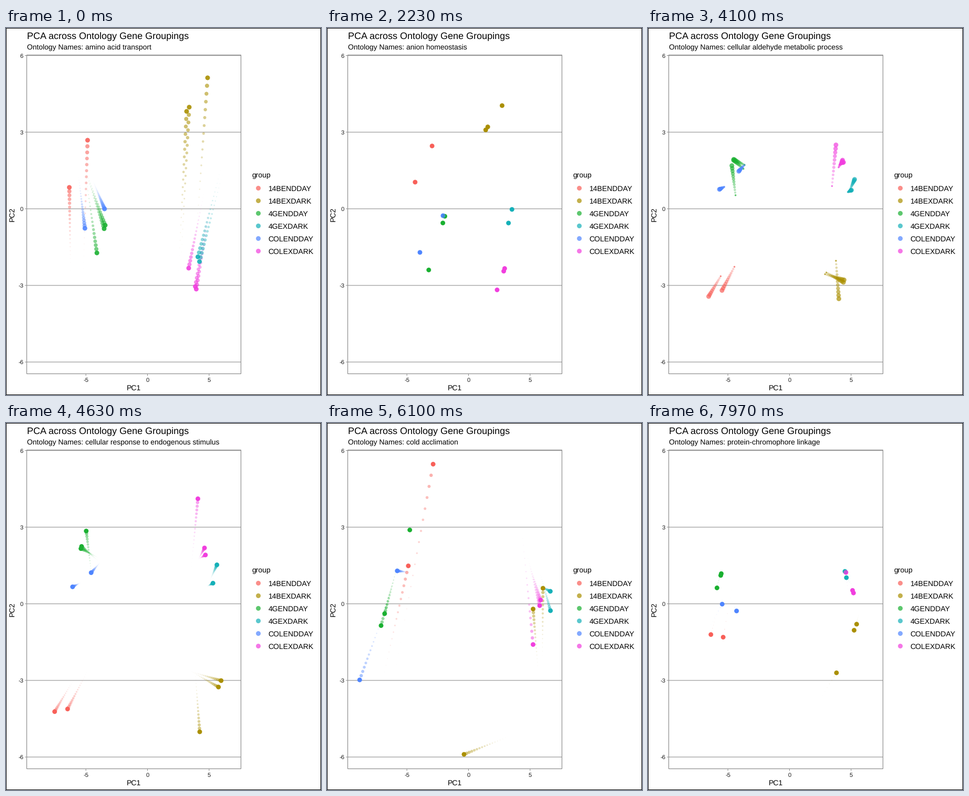
A matplotlib script that plays this animation: 600x700 px, repeating every 8 s.

```python
import numpy as np
import matplotlib.pyplot as plt
from matplotlib.animation import FuncAnimation
from matplotlib.colors import to_rgb

plt.rcParams.update({"path.snap": False, "text.hinting": "none",
                     "font.family": "Liberation Sans"})

W, H, DPI = 600, 700, 100
PX = 72 / DPI              # points per pixel
FRAMES = 240
CYCLE, MOVE = 45, 22       # frames from state to state, and in motion
WAKE = 24                  # frames a trail dot lives
RADIUS, ALPHA = 4.5, 0.7
GRID, FRAME = "#a6a6a6", "#8c8c8c"

NAMES = ["amino acid transport", "anion homeostasis",
         "cellular aldehyde metabolic process",
         "cellular response to endogenous stimulus",
         "cold acclimation", "protein-chromophore linkage"]

# Samples sit on a line through the group centre: a pair, or two close and one apart
LAYOUT = {2: np.array([-1, 1]), 3: np.array([-0.6, -0.4, 1])}


class Group:
    """A set of samples; each key point is (centre x, centre y, spread)."""

    def __init__(self, name, color, size, width, lean, *keys):
        self.name, self.color, self.size = name, color, size
        x, y, spread = np.array(keys).T[:, :, None]
        t = LAYOUT[size]
        self.states = np.stack([x + t * (width + lean * spread),
                                y + t * spread], axis=-1)


GROUPS = [
    Group("14BENDDAY", "#f85f58", 2, -12, -0.12,
          (135, 470, 0), (138, 259, 45), (184, 259.5, 34.5), (151.5, 464.5, 9),
          (105, 548, 2.5), (178.5, 175.5, 97), (131.5, 406, -2.5)),
    Group("14BEXDARK", "#aa8f00", 3, 5, -0.5,
          (340, 459, -30), (359, 135, -40), (314, 177, -29), (345, 460, -16),
          (394.5, 528, 61), (355, 434, 198), (383, 418.5, 58)),
    Group("4GENDDAY", "#19b030", 3, 0, -0.3,
          (149.5, 266, 0), (183, 396, 33), (213, 397.5, 64), (177.5, 283, 36),
          (146.5, 227, -21), (123.5, 318, -114), (136.5, 297.5, 17)),
    Group("4GEXDARK", "#14b0b8", 2, -2, -0.1,
          (414.5, 259.5, -4.5), (367, 441, -4.5), (349, 359, 13), (383, 310, 3),
          (398, 288, 17.5), (425.5, 339.5, -18.5), (376.5, 289, -6)),
    Group("COLENDDAY", "#4e85ff", 2, -15, -0.2,
          (150, 278, -8), (169, 363.5, 18.5), (199, 393, 35), (164.5, 282, 21),
          (144.5, 299, 13.5), (98, 386, 104), (155, 352, -6.5)),
    Group("COLEXDARK", "#f13ede", 3, -9, 0,
          (388.5, 310, -7), (357, 483, -25), (333, 474, 25.5), (359.5, 276, 25.5),
          (374.5, 211.5, -67), (401.5, 369.5, 53), (386, 309.5, -24.5)),
]
STATES = np.concatenate([g.states for g in GROUPS], axis=1)


def phase(frame):
    """Index of the running transition and the frames spent in it."""
    return divmod(frame + CYCLE - MOVE, CYCLE)


def positions(frame):
    k, step = phase(frame)
    if k < 0:
        return STATES[0]
    t = min(step / MOVE, 1)
    return STATES[k] + (STATES[k + 1] - STATES[k]) * t


def name_at(frame):
    k, step = phase(frame)
    return NAMES[k if step >= MOVE / 2 + 1 else k - 1]


fig = plt.figure(figsize=(W / DPI, H / DPI), dpi=DPI, facecolor="white")
ax = fig.add_axes([0, 0, 1, 1])
ax.set_xlim(0, W)
ax.set_ylim(H, 0)
ax.axis("off")


def label(x, y, text, size, color="black", **kw):
    return ax.text(x, y, text, fontsize=size * PX, color=color,
                   **{"va": "baseline", **kw})


def line(xs, ys, color, width):
    ax.plot(xs, ys, color=color, lw=width * PX, solid_capstyle="butt", zorder=1)


def box(x0, y0, x1, y1, color, width):
    ax.add_patch(plt.Rectangle((x0, y0), x1 - x0, y1 - y0, fill=False,
                               ec=color, lw=width * PX, zorder=1))


box(0.5, 0.5, W - 0.5, H - 0.5, "black", 1)
for value in range(-6, 7, 3):
    y = 344.8 - value * 48.72
    line([40, 447], [y, y], GRID, 1.4)
    line([36, 40], [y, y], FRAME, 1)
    label(33, y + 4.2, str(value), 11.2, "#1a1a1a", ha="right")
for value in (-5, 0, 5):
    x = 269.5 + value * 23.47
    line([x, x], [660, 663.5], FRAME, 1)
    label(x, 675, str(value), 11.2, "#1a1a1a", ha="center")
box(39.5, 51.5, 447.5, 659.5, FRAME, 1.2)

label(39.5, 20, "PCA across Ontology Gene Groupings", 18.05)
subtitle = label(39.5, 41, "", 13.95)
label(243.5, 691, "PC1", 14, ha="center")
label(12, 355.5, "PC2", 14, ha="center", va="center", rotation=90)

label(468.5, 285, "group", 14)
for i, group in enumerate(GROUPS):
    y = 305.5 + 24 * i
    ax.add_patch(plt.Circle((480.6, y), RADIUS, color=group.color,
                            alpha=ALPHA, lw=0))
    label(499.5, y + 5.4, group.name, 14)

# Oldest trail dots come first so the newest are painted on top
ages = np.arange(WAKE - 1, -1, -1)
base = np.array([to_rgb(g.color) for g in GROUPS for _ in range(g.size)])
fade = np.repeat((1 - ages / WAKE) ** 1.6, len(base))
radii = 0.35 + (RADIUS - 0.35) * fade
colors = np.column_stack([np.tile(base, (WAKE, 1)), ALPHA * fade])
blank = np.zeros(len(fade))
dots = ax.scatter(blank, blank, s=(2 * PX * radii) ** 2, c=colors,
                  linewidths=0, zorder=3)


def draw(frame):
    dots.set_offsets(np.vstack([positions(frame - a) for a in ages]))
    subtitle.set_text("Ontology Names: " + name_at(frame))
    return dots, subtitle


# The first state is reached on frame 0, so the phase there equals MOVE
anim = FuncAnimation(fig, draw, frames=FRAMES, init_func=lambda: draw(0),
                     interval=8000 / FRAMES, repeat=True, repeat_delay=0,
                     blit=False)
plt.show()
```
